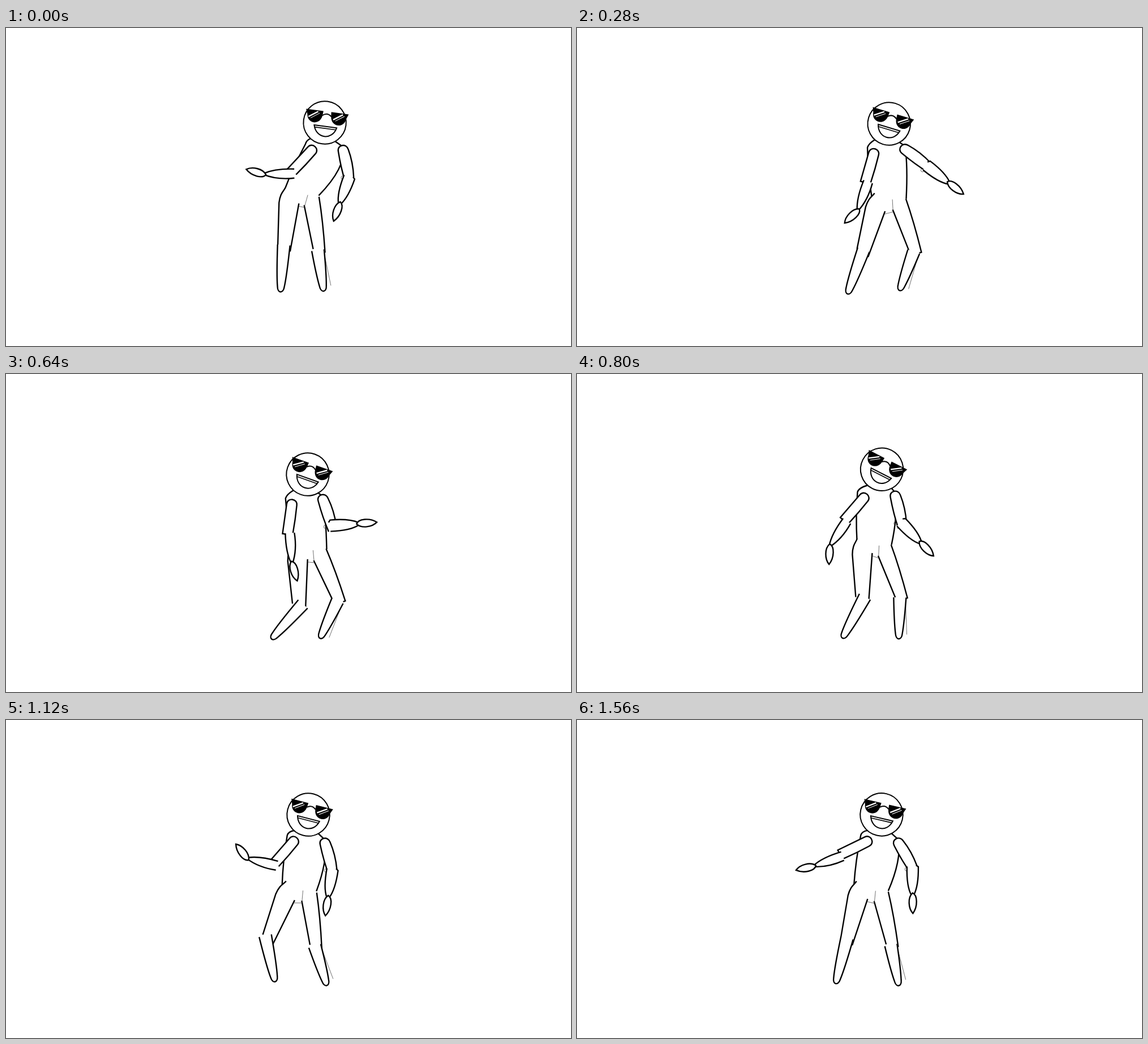
Recreate the animation shown at these times as an HTML page with a canvas. Size 998x561 px, loop 1.6 s.

```html
<!DOCTYPE html>
<html lang="en">
<head>
<meta charset="utf-8">
<title>Dancing figure</title>
<style>
  html, body { margin: 0; width: 100%; height: 100%; overflow: hidden; background: #fff; }
  canvas { display: block; width: 998px; height: 561px; }
</style>
</head>
<body>
<canvas id="stage" width="998" height="561"></canvas>
<script>
const ctx = document.getElementById('stage').getContext('2d');
const LOOP = 1600, STEP = 40, RAD = Math.PI / 180;
const SPINE = 140, NECK = 49, SHOULDER = 28, HIP = 19.5;

// Key poses. Everything else follows from the skeleton; angles in degrees.
const POSES = [
  { t: 0, root: [521, 300.5, 6], spine: [17.5, 7.6], armL: [133, 179, 195], armR: [79, 109], legL: [97, 94], legR: [82, 82] },
  { t: 280, root: [550, 309, -2], spine: [0.5, 16.8], armL: [106, 110, 136], armR: [38, 37], legL: [107, 110], legR: [72, 110] },
  { t: 640, root: [535, 317, -3], spine: [-0.8, 19.4], armL: [98, 86, 73], armR: [73, -5], legL: [89, 132], legR: [68, 115] },
  { t: 920, root: [517, 300.5, 7], spine: [10.6, 30.3], armL: [153, 160, 126], armR: [78, 88], legL: [96, 103], legR: [75, 73.5] },
  { t: 1120, root: [517, 306, 9], spine: [7, 14.4], armL: [131, 194, 231], armR: [76, 98], legL: [113, 78], legR: [83, 73] },
  { t: 1280, root: [514, 301, 12], spine: [7, 9.8], armL: [128, 195, 223], armR: [77, 101], legL: [105, 88], legR: [79, 76.5] },
  { t: 1560, root: [518.5, 305.5, 9], spine: [8, 13.1], armL: [154, 161, 167], armR: [61, 89], legL: [105, 104], legR: [78, 79] }];

// Pose at time t: cubic Hermite through the keys.
function poseAt(t) {
  const last = POSES.length - 1;
  let i = 0;
  while (i < last - 1 && t >= POSES[i + 1].t) i++;
  const h = POSES[i + 1].t - POSES[i].t;
  const u = Math.min(1, (t - POSES[i].t) / h);
  const ease = (part, c) => {
    const slope = k => {
      const a = POSES[Math.max(0, k - 1)], b = POSES[Math.min(last, k + 1)];
      return (b[part][c] - a[part][c]) / (b.t - a.t);
    };
    const p = POSES[i][part][c], q = POSES[i + 1][part][c];
    const m = slope(i) * h, n = slope(i + 1) * h;
    return p + u * (m + u * (3 * (q - p) - 2 * m - n + u * (2 * (p - q) + m + n)));
  };
  const pose = {};
  for (const part of ['root', 'spine', 'armL', 'armR', 'legL', 'legR'])
    pose[part] = POSES[i][part].map((_, c) => ease(part, c));
  return pose;
}

const bone = ([x, y], angle) => ({ x, y, a: angle * RAD });
// Stage position of a point given along and across a bone.
const at = (b, x, y) => [
  b.x + x * Math.cos(b.a) - y * Math.sin(b.a),
  b.y + x * Math.sin(b.a) + y * Math.cos(b.a)];

function draw(b, outline, { fill = '#fff', body = outline, width = 2.4, color = '#000' } = {}) {
  ctx.save();
  ctx.translate(b.x, b.y);
  ctx.rotate(b.a);
  if (fill) {
    ctx.fillStyle = fill;
    ctx.fill(new Path2D(body));
  }
  if (width) {
    ctx.lineWidth = width;
    ctx.strokeStyle = color;
    ctx.stroke(new Path2D(outline));
  }
  ctx.restore();
}

const STAGE = bone([0, 0], 0);
const THIN = { fill: null, width: 0.7, color: '#333' };
const thinLine = (p, q) => draw(STAGE, `M${p}L${q}`, THIN);

const UPPER_L = 'M53,3L53,9L0,9C-12,9 -12,-9 0,-9Q25,-10 50,-9';
const UPPER_R = 'M57,7Q30,10 0,9C-12,9 -12,-8 0,-9Q24,-13 50,-9';
const FORE_L = 'M-2,-8C20,-10 38,-7 52,-1L52,1C38,7 20,9 -2,8';
const FORE_R = 'M-4,-7L-1,-11C20,-11 38,-8 49,-2L49,2C38,8 20,10 -2,9';
const HAND = 'M-4,0C0,-9 20,-9 32,0C23,8 4,9 -4,0Z';
const THIGH_L = ['M-16,10C-9,12 -6,18 12,18L87,11', 'M9,-17L94,-12l0,4'];
const THIGH_R = ['M8,15L87,10', 'M-3,-13Q40,-14 95,-10l0,4'];

function torso(head, left, right, hipL, hipR) {
  const [x, y] = [left[0] - 11, left[1] - 11];
  const [wx, wy] = [hipL[0] - 10, hipL[1] - 12];
  draw(STAGE, `M${wx},${wy}Q${(x + wx) / 2 - 3},${(y + wy) / 2} ${x},${y}` +
    `Q${x + 2},${y - 7} ${head.x - 25},${head.y + 28}L${head.x + 14},${head.y + 30}` +
    `L${right[0]},${right[1] - 6}Q${right[0] + 5},${right[1] + 30} ${hipR[0] + 12},${hipR[1] - 7}`);
}

function thigh(b, [outer, inner]) {
  const ends = inner.match(/-?[\d.]+,-?[\d.]+/g);
  const far = ends[ends.length - 2];
  draw(b, outer + inner, { body: `${outer}L${far}L${ends[0]}Z` });
}

function shin(b, start, len) {
  const mid = len * 0.6, end = len - 10, tip = len + 2;
  draw(b, `M${start},11Q${mid},9 ${end},6C${tip},5 ${tip},-5 ${end},-6Q${mid},-9 ${start},-11`);
}

function legs(pose, hipL, hipR, headX) {
  const thighL = bone(hipL, pose.legL[0]), thighR = bone(hipR, pose.legR[0]);
  const shinL = bone(at(thighL, 96, 0), pose.legL[1]);
  const shinR = bone(at(thighR, 89, 2), pose.legR[1]);
  thigh(thighL, THIGH_L);
  thigh(thighR, THIGH_R);

  const [ax, ay] = at(thighL, 11, -17), [bx, by] = at(thighR, 10, 15);
  thinLine([ax, ay + 3], [bx, by + 2]);
  thinLine([bx, by + 2], [bx + (headX - bx) * 0.17, by - 20]);

  thinLine(at(shinR, 5, -10), at(shinR, 66, -14));
  shin(shinL, -11, 73);
  shin(shinR, 1, 75);
}

function arm(shoulder, [a1, a2, a3 = a2], elbow, foreLen, upperPath, forePath) {
  const upper = bone(shoulder, a1);
  const fore = bone(at(upper, ...elbow), a2);
  draw(upper, upperPath);
  draw(fore, forePath);
  draw(bone(at(fore, foreLen, 0), a3), HAND);
}

function face(b) {
  const line = (path, width, color) => draw(b, path, { fill: null, width, color });
  draw(b, 'M37.7,0A37.7,37.7 0 1 1 -37.7,0A37.7,37.7 0 1 1 37.7,0Z', { width: 2 });
  draw(b, 'M-18,6.5L22,6.5C17,30 -12,30 -18,6.5Z', { width: 2 });
  line('M-17,10L21,10', 1.6);
  line('M-6,-12Q2,-19 10,-12', 2);
  for (const side of [-1, 1]) {
    const x = d => 2 + side * d; // mirrored about the bridge
    draw(b, `M${x(38)},-20L${x(7)},-20L${x(7.5)},-13` +
      `C${x(9)},7 ${x(33)},6 ${x(34.5)},-11Z`, { fill: '#000', width: 0 });
    const glare = 2 + side * 22;
    line(`M${glare - 10},-7L${glare + 6},-18`, 2.4, '#fff');
    line(`M${glare - 6},-5L${glare + 9},-15.5`, 1, '#fff');
  }
}

function render(t) {
  ctx.fillStyle = '#fff';
  ctx.fillRect(0, 0, 998, 561);

  const pose = poseAt(t);
  const [x, y, tilt] = pose.root, [lean, nod] = pose.spine;
  const pelvis = bone([x, y], tilt);
  const head = bone(at(bone([x, y], lean), 0, -SPINE), nod);
  // The chest swings against the nod of the head.
  const chest = bone([head.x + (18 - nod) * 0.45, head.y + NECK], tilt - 6);
  const hipL = at(pelvis, -HIP, 0), hipR = at(pelvis, HIP, 0);
  const left = at(chest, -SHOULDER, 0), right = at(chest, SHOULDER, 0);

  torso(head, left, right, hipL, hipR);
  legs(pose, hipL, hipR, head.x);
  face(head);
  draw(bone(at(bone(right, pose.armR[0]), 47, 10), 0),
    'M-3,0a3,3 0 1 0 6,0a3,3 0 1 0 -6,0', THIN);
  arm(right, pose.armR, [49, 0], 49, UPPER_R, FORE_R);
  arm(left, pose.armL, [52, -4], 52, UPPER_L, FORE_L);
}

function tick() {
  const t = performance.now() % LOOP;
  render(Math.floor(t / STEP) * STEP);
  requestAnimationFrame(tick);
}
tick();
</script>
</body>
</html>
```
